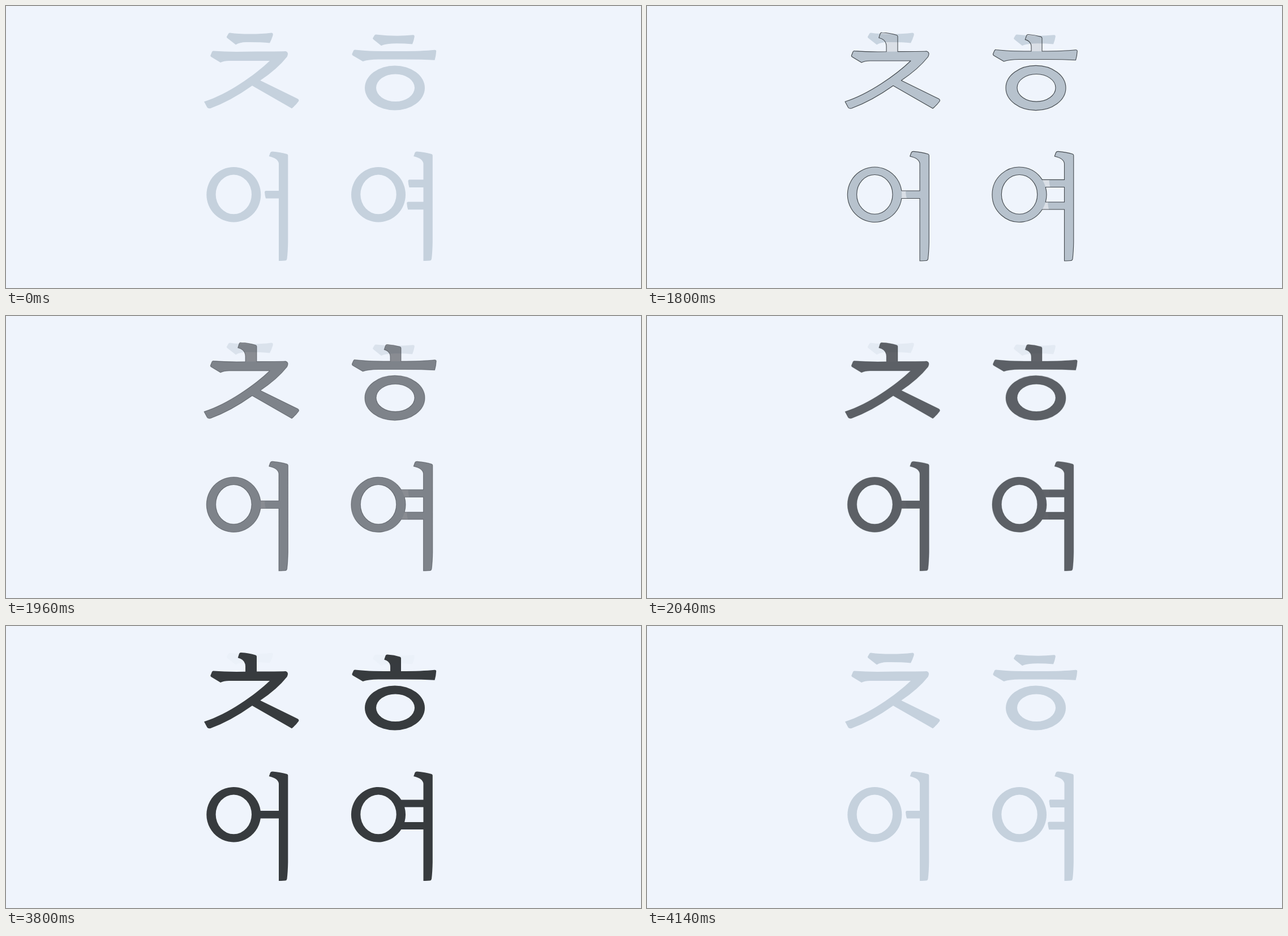
An HTML page for the animation above (4160 ms loop, 1122 by 499 pixels).

```html
<!DOCTYPE html>
<html lang="ko">
<head>
<meta charset="utf-8">
<title>Letter shapes</title>
<style>
html, body { margin: 0; width: 100%; height: 100%; overflow: hidden; background: #eff4fc; }
svg { display: block; width: 100vw; height: 100vh; }
path { fill-rule: evenodd; }
#plain { fill: #c5d1dd; }
#line { fill: none; stroke: #34393e; stroke-width: 1.1; stroke-linejoin: round; }
#solid { fill: #24272b; }
</style>
</head>
<body>
<svg viewBox="0 0 1122 499">
  <path id="plain"/>
  <path id="solid"/>
  <path id="line"/>
</svg>
<script>
const LOOP = 4160;
const STEP = 40;

const oval = (cx, cy, rx, ry) =>
  `M${cx - rx} ${cy}a${rx} ${ry} 0 1 1 ${2 * rx} 0a${rx} ${ry} 0 1 1 ${-2 * rx} 0Z`;

// Upper row: the optional stem is spliced into the top edge.
const chieut = stem => `M367 79.6Q365 79 364 81L361.4 87.5Q361 89 362.5 90L379 100
  Q385 97.2 394 97H466C440 122 392 156 350 169.3L355.5 179.5Q357 182 361.5 181
  Q397 168 435 141L505 181.2Q512 175.5 517 168.5Q518.3 166 515.5 164.3L449.3 131.7
  Q479 112 496.5 90Q500.5 82 494 80Q480 80.6 443 80.6${stem}L423 80.8Q390 81.4 367 79.6Z`;
const chieutStem = `V54Q443 52.2 441 51.5Q429 47.7 415.5 47Q412.8 46.8 412 49L409.7 56.3
  Q420.5 58.8 422.6 67.5L423 71V80.8`;
const chieutDash = `M396 47.5Q394 47 393 49L390 54.2Q389.6 55.6 391 56.8L406 68.5
  Q413 64.2 424 64.1Q448 63.8 466 65.5Q469 60 471.5 52Q472.5 47 468.5 47.5
  Q452 49.6 430 49.5Q410 49.5 396 47.5Z`;

const hieut = stem => `M617 77.5Q615 77 614 79L611.6 84.5Q611 86.5 613 87.8L630.5 98
  Q640 94.8 658 94.5H705Q736 94.5 757.5 95.7Q759.8 88 760.2 80Q760.3 77.4 757 77.8
  Q736 80 698 80${stem}H679Q638 80.1 617 77.5Z`;
const hieutStem = `V57Q698 55 696 54.4Q686 51.3 674 50.5Q671.3 50.3 670.6 52.4L668.2 59.4
  Q677 61.8 678.7 69L679 72V80`;
const hieutDash = `M654 50.5Q652 50 651 52L648.3 56.5Q647.8 57.8 649 59L663 70.3
  Q670 66.8 682 66.4Q702 66 718 67.5Q720.5 62 721.8 54Q722 51 719 51.2
  Q690 54.5 654 50.5Z`;
const hieutRing = oval(687, 145, 53, 39.6) + oval(688, 144.8, 34, 24.3);

// Lower row: both vowels share the ring and the long post.
const ring = x => oval(x + 48, 333.8, 48, 48.7);
const hole = x => oval(x + 48, 333.4, 31.7, 34.9);
const postTop = x => `V279Q${x - 1} 269.5 ${x - 17.3} 266L${x - 15} 259.5
  Q${x - 14} 257.3 ${x - 11} 257.4Q${x + 3} 258.4 ${x + 14.5} 262Q${x + 16.3} 262.7 ${x + 16.3} 264.5
  V418Q${x + 16} 435 ${x + 14.5} 447.5Q${x + 14} 450.3 ${x + 11.5} 450.5Q${x + 6} 451.2 ${x} 450.9`;
const post = x => `M${x} 450.9${postTop(x)}Z`;
const nub = (x, right, y) => `M${right} ${y}H${x + 2}Q${x} ${y} ${x} ${y + 2.5}
  Q${x + .5} ${y + 9} ${x + 2} ${y + 13.6}H${right}Z`;
const arc = (rx, ry, big, x, y) => `A${rx} ${ry} 0 ${big} 1 ${x} ${y}`;

const eo = `M449.8 340.5${arc(48, 48.7, 1, 449.8, 327)}H482${postTop(482)}V340.5Z` + hole(354.3);
const yeo = `M698.3 360${arc(48, 48.7, 1, 698.3, 307.4)}H737.5${postTop(737.5)}V360Z
  M704.2 320.5${arc(48, 48.7, 0, 704.2, 347)}H737.5V320.5Z` + hole(610);

const apart = chieut("") + chieutDash + hieut("") + hieutDash + hieutRing +
  ring(354.3) + hole(354.3) + post(482) + nub(457, 482, 327) +
  ring(610) + hole(610) + post(737.5) + nub(710.5, 737.5, 307.3) + nub(708.2, 737.5, 346.6);
const joined = chieut(chieutStem) + hieut(hieutStem) + hieutRing + eo + yeo;

const [plain, line, solid] = ["plain", "line", "solid"].map(id => document.getElementById(id));
plain.setAttribute("d", apart);
line.setAttribute("d", joined);
solid.setAttribute("d", joined);

// Stepped fade: the first step is already visible at its start time.
const fade = (t, start, steps) =>
  t < start ? 0 : Math.min(1, (Math.floor((t - start) / STEP) + 1) / steps);

function draw(t) {
  const trace = fade(t, 560, 11);
  const fill = fade(t, 1800, 10);
  const back = t >= 4140 ? 1 : fade(t, 3800, 10);
  plain.style.opacity = 1 - fill + back;
  line.style.opacity = trace * (1 - fill);
  solid.style.opacity = fill - back;
}

const began = performance.now();
function tick() {
  draw((performance.now() - began) % LOOP);
  requestAnimationFrame(tick);
}
tick();
</script>
</body>
</html>
```
